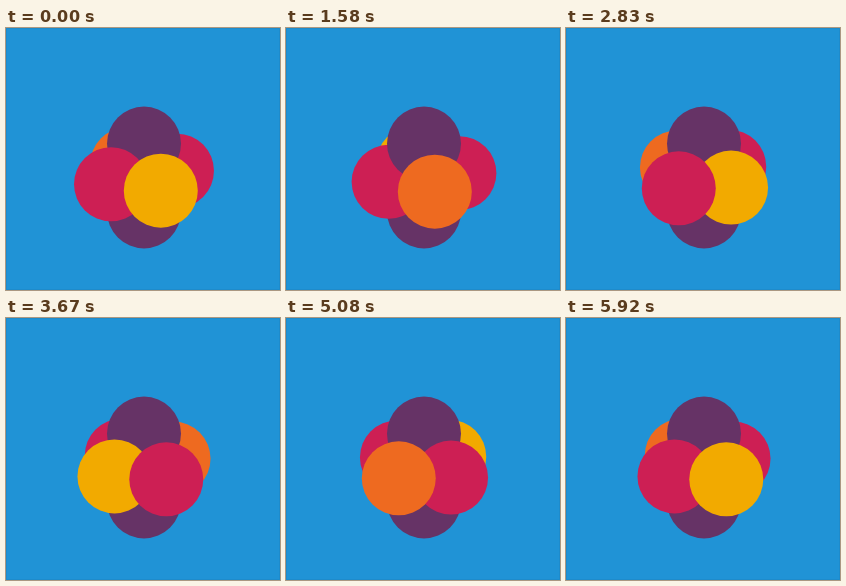
Animation, 274 px wide and 262 px high, one loop 6010 ms. Source, as an HTML page with a canvas:

```html
<!DOCTYPE html>
<html lang="en">
<head>
<meta charset="utf-8">
<title>Orbiting balls</title>
<style>
  html, body { margin: 0; width: 100%; height: 100%; overflow: hidden; background: #2093d6; }
  canvas { display: block; }
</style>
</head>
<body>
<canvas id="stage" width="274" height="262"></canvas>
<script>
const ctx = document.getElementById('stage').getContext('2d');

const LOOP = 6010;
const STEP = 1000 / 12;
const STEPS = 72;
const CENTER = { x: 138, y: 149.5 };
const RADIUS = 37;
const TILT_SIN = 0.4;
const TILT_COS = Math.sqrt(1 - TILT_SIN ** 2);

const BLUE = '#2093d6';
const EDGE = '#1e8bcb';
const PURPLE = '#663366';
const RING = ['#f2aa00', '#cd1f54', '#ee6a20', '#cd1f54'];

// Place a point of the tilted octahedron on the stage, with its depth.
function project(x, up, toward, color) {
  return {
    color,
    x: CENTER.x + RADIUS * x,
    y: CENTER.y + RADIUS * (toward * TILT_SIN - up * TILT_COS),
    depth: toward * TILT_COS + up * TILT_SIN
  };
}

function drawBall({ x, y, color }) {
  ctx.fillStyle = color;
  ctx.beginPath();
  ctx.arc(x, y, RADIUS, 0, Math.PI * 2);
  ctx.fill();
}

function draw(time) {
  // Twelve poses per second, switching on whole hundredths of a second.
  const step = Math.min(STEPS - 1, Math.floor((time + 3.5) / STEP));
  const turn = 27 - step * 10;

  const balls = RING.map((color, i) => {
    const angle = (turn + i * 90) * Math.PI / 180;
    return project(Math.sin(angle), 0, Math.cos(angle), color);
  });
  balls.push(project(0, 1, 0, PURPLE), project(0, -1, 0, PURPLE));
  balls.sort((a, b) => a.depth - b.depth);

  ctx.fillStyle = BLUE;
  ctx.fillRect(0, 0, 274, 262);
  ctx.strokeStyle = EDGE;
  ctx.strokeRect(0.5, 0.5, 273, 261);
  balls.forEach(drawBall);
}

const start = performance.now();
function tick() {
  draw((performance.now() - start) % LOOP);
  requestAnimationFrame(tick);
}
tick();
</script>
</body>
</html>
```
